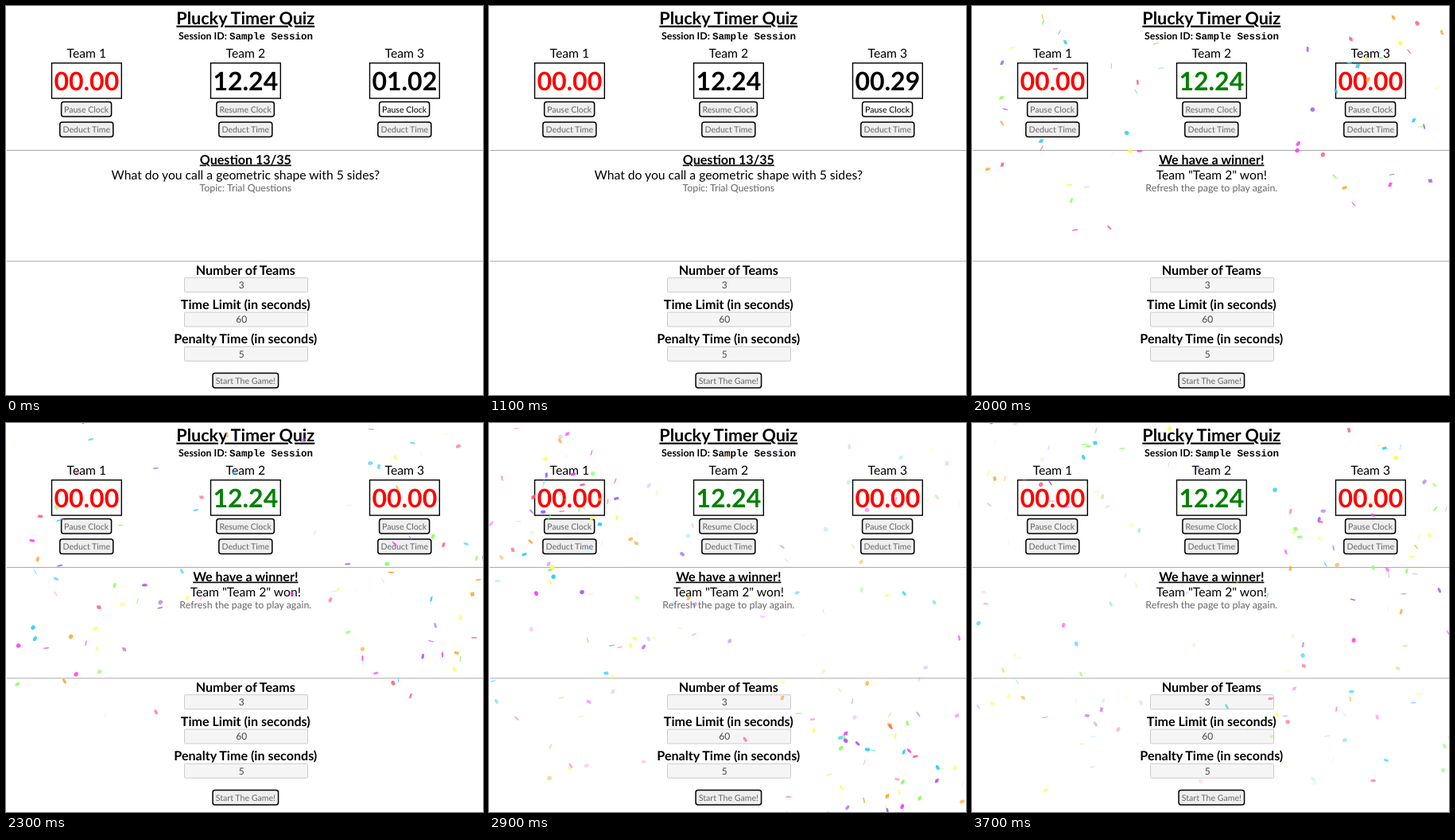
Recreate the animation shown at these times as an HTML page with a canvas. Size 600 by 489 pixels, loop 3800 ms.

```html
<!DOCTYPE html>
<html lang="en">
<head>
<meta charset="utf-8">
<title>Plucky Timer Quiz</title>
<style>
  html, body { margin: 0; width: 600px; height: 489px; overflow: hidden; background: #fff; }
  svg, canvas { position: absolute; left: 0; top: 0; }
  text { font: 15.7px Lato, sans-serif; text-anchor: middle; white-space: pre; text-rendering: geometricPrecision; }
  .bold { font-size: 16.1px; font-weight: 700; }
  .line { text-decoration: underline; }
  .title { font-size: 21.6px; }
  .session { font-size: 12.4px; text-anchor: start; }
  .mono { font: 700 12.5px "Liberation Mono", monospace; text-anchor: start; }
  .clock { font-size: 32px; font-weight: 700; }
  .small { font-size: 12.4px; fill: #666; }
  .label { font-size: 10.6px; fill: #666; }
  .value { font-size: 12px; fill: #444; }
  .button { fill: #efefef; stroke: #000; stroke-width: 1.5; }
  .input { fill: #f5f5f5; stroke: #ccc; }
  .frame { fill: #fff; stroke: #000; stroke-width: 1.4; }
  .rule { fill: #aaa; }
</style>
</head>
<body>
<svg id="page" width="600" height="489"></svg>
<canvas id="confetti" width="600" height="489"></canvas>
<script>
const LOOP = 3800, STEP = 100, WIN = 1500;
const SCALE = 0.536, PIECE = 12, LIFE = 60, TICKS_PER_MS = 0.04;
const COLORS = ['38,204,255', '162,90,253', '255,94,126', '136,255,90',
                '252,255,66', '255,166,45', '255,54,255'];
const page = document.getElementById('page');
const ctx = document.getElementById('confetti').getContext('2d');

function add(tag, attrs, content = '') {
  const node = document.createElementNS('http://www.w3.org/2000/svg', tag);
  for (const name in attrs) node.setAttribute(name, attrs[name]);
  node.textContent = content;
  page.append(node);
  return node;
}
const text = (x, y, cls, content) => add('text', { x, y, class: cls }, content);
const rect = (x, y, width, height, cls, rx = 0) => add('rect', { x, y, width, height, class: cls, rx });

function button(cx, y, width, content) {
  const box = rect(cx - width / 2, y, width, 18.6, 'button', 3);
  const label = text(cx, y + 13.2, 'label', content);
  return enabled => {
    box.style.fill = enabled ? '#fff' : '';
    label.style.fill = enabled ? '#000' : '';
  };
}

function team(number, time, action) {
  const cx = 200 * number - 98.7;
  text(cx, 64.6, '', 'Team ' + number);
  rect(cx - 43.8, 71.7, 87.8, 44.4, 'frame');
  const clock = text(cx, 106, 'clock', time);
  const setEnabled = button(cx - 0.2, 120.5, action === 'Pause' ? 63 : 72.5, action + ' Clock');
  button(cx, 145.9, 67, 'Deduct Time');
  return { clock, setEnabled };
}

function field(y, name, value) {
  text(301.3, y, 'bold', name);
  rect(224.5, y + 4, 155, 18, 'input', 1);
  text(296.3, y + 17.4, 'value', value);
}

text(301.3, 22.6, 'bold line title', 'Plucky Timer Quiz');
text(217, 42, 'bold session', 'Session ID:');
text(281, 42, 'mono', 'Sample Session');
const first = team(1, '00.00', 'Pause');
const second = team(2, '12.24', 'Resume');
const third = team(3, '01.02', 'Pause');
first.clock.style.fill = 'red';
rect(1, 181, 599, 1, 'rule');
const heading = text(301.3, 198.6, 'bold line');
const message = text(301.3, 217.8, '');
const note = text(301.3, 233.2, 'small');
rect(1, 320.4, 599, 1, 'rule');
field(337.7, 'Number of Teams', '3');
field(381, 'Time Limit (in seconds)', '60');
field(424.3, 'Penalty Time (in seconds)', '5');
button(301.3, 461.4, 82.5, 'Start The Game!');

let seed = 7;
function random() {
  seed = (seed * 16807) % 2147483647;
  return seed / 2147483647;
}

// start time, left x, left y, right x, right y, pieces on each side
const pieces = [
  [1785, 140, 130, 510, 140, 30],
  [2120, 70, 210, 505, 240, 28],
  [2460, 95, 150, 515, 365, 34],
  [2795, 95, 140, 480, 440, 28],
  [3125, -4, 393, 496, 229, 46],
  [3465, 110, -30, 505, 125, 26]
].flatMap(([start, lx, ly, rx, ry, count]) =>
  Array.from({ length: count * 2 }, (_, i) => ({
    start,
    x: (i % 2 ? rx : lx) / SCALE,
    y: (i % 2 ? ry : ly) / SCALE,
    color: COLORS[(i >> 1) % COLORS.length],
    round: random() < 0.5,
    angle: random() * 2 * Math.PI,
    speed: 15 + random() * 30,
    wobble: random() * 10,
    wobbleSpeed: Math.min(0.11, random() * 0.1 + 0.05),
    tilt: (random() * 0.5 + 0.25) * Math.PI,
    stretch: random() + 2.5
  })));

function drawPiece(p, tick) {
  const travel = p.speed * 10 * (1 - 0.9 ** tick);
  const x = p.x + Math.cos(p.angle) * travel;
  const y = p.y + Math.sin(p.angle) * travel + 3 * tick;
  const wobble = p.wobble + p.wobbleSpeed * tick;
  const tilt = p.tilt + 0.1 * tick;
  const wx = PIECE * Math.cos(wobble), wy = PIECE * Math.sin(wobble);
  const tx = p.stretch * Math.cos(tilt), ty = p.stretch * Math.sin(tilt);
  ctx.fillStyle = `rgba(${p.color},${1 - tick / LIFE})`;
  ctx.beginPath();
  if (p.round) {
    ctx.ellipse(x, y, Math.abs(wx) * 0.6, Math.abs(wy) * 0.6, Math.PI / 10 * wobble, 0, 2 * Math.PI);
  } else {
    ctx.moveTo(x, y);
    ctx.lineTo(x + wx, y + ty);
    ctx.lineTo(x + wx + tx, y + wy + ty);
    ctx.lineTo(x + tx, y + wy);
  }
  ctx.fill();
}

function render(now) {
  const t = Math.floor(now % LOOP / STEP) * STEP;
  const won = t >= WIN;
  third.clock.textContent = '0' + (won ? 0 : 1.02 - t / 1500).toFixed(2);
  third.clock.style.fill = won ? 'red' : '#000';
  third.setEnabled(!won);
  second.clock.style.fill = won ? 'green' : '#000';
  heading.textContent = won ? 'We have a winner!' : 'Question 13/35';
  message.textContent = won ? 'Team "Team 2" won!' : 'What do you call a geometric shape with 5 sides?';
  note.textContent = won ? 'Refresh the page to play again.' : 'Topic: Trial Questions';

  ctx.setTransform(1, 0, 0, 1, 0, 0);
  ctx.clearRect(0, 0, 600, 489);
  ctx.scale(SCALE, SCALE);
  for (const p of pieces) {
    const tick = (t - p.start) * TICKS_PER_MS;
    if (tick >= 0 && tick < LIFE) drawPiece(p, tick);
  }
}

const origin = performance.now();
function loop() {
  render(performance.now() - origin);
  requestAnimationFrame(loop);
}
loop();
</script>
</body>
</html>
```
